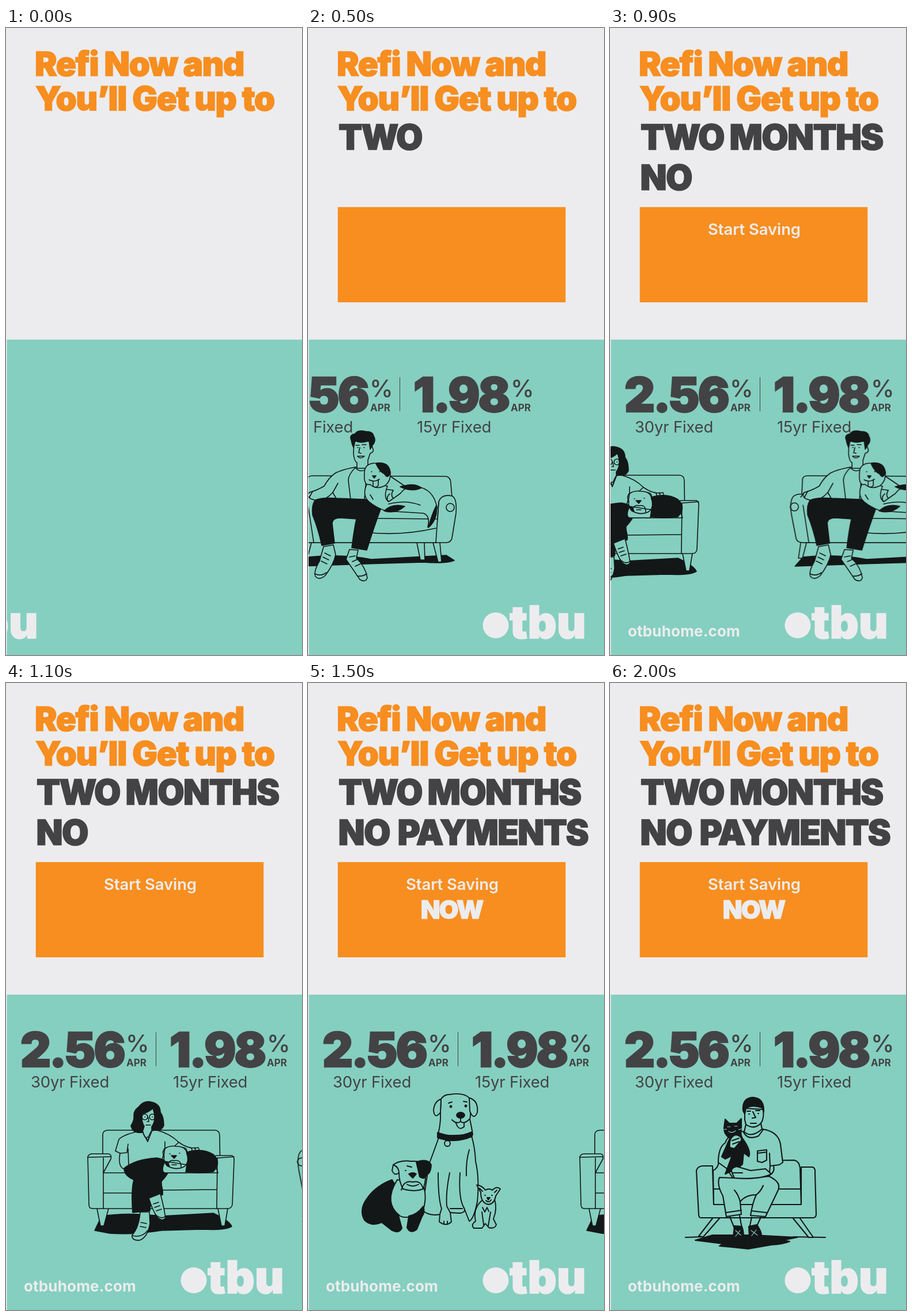
Animation, 514 px wide and 1088 px high, one loop 7000 ms. Source, as an HTML page:

```html
<!DOCTYPE html>
<html lang="en">
<head>
<meta charset="utf-8">
<title>Refi Now</title>
<style>
html, body { margin: 0; height: 100%; overflow: hidden; background: #ececef; }
svg { display: block; width: 100vw; height: 100vh; }
text { --ink: #434345; font-family: Inter, Roboto, sans-serif; fill: var(--ink); }

/* A thin outline makes the black weight heavier still. */
.head, .caps, .rate, .now, .brand { font-weight: 900; stroke: var(--ink); stroke-width: 1.6px; }
.head { font-size: 58px; letter-spacing: -1.4px; --ink: #f78e1f; }
.caps { font-size: 60px; letter-spacing: -1.7px; }
.rate { font-size: 82px; letter-spacing: -3px; stroke-width: 2.4px; }
.pct { font-size: 41px; font-weight: 500; }
.apr { font-size: 17px; font-weight: 700; }
.term { font-size: 27.5px; letter-spacing: -.2px; }
.pale { --ink: #ececef; }
.mid { text-anchor: middle; }
.start { font-size: 27.5px; font-weight: 600; letter-spacing: -.1px; }
.now { font-size: 44px; letter-spacing: -2px; stroke-width: 1.2px; }
.site { font-size: 26px; font-weight: 700; letter-spacing: .15px; }
.brand { font-size: 78px; letter-spacing: 0; }

.art { fill: none; stroke: #131718; stroke-width: 1.6; stroke-linecap: round; stroke-linejoin: round; }
.art .o { fill: #85cfc0; }
.art .k { fill: #131718; }
.art .thin { stroke: #85cfc0; stroke-width: 1.2; }

/* The 1 ms lead keeps every step clear of its boundary. Ten steps per second. */
.move { animation: 7s step-end -1ms infinite; }
#logo { animation-name: logo; }
#rates { animation-name: rates; }
#man { animation-name: man; }
#woman { animation-name: woman; }
#dogs { animation-name: dogs; stroke-width: 1.9; }
#cat { animation-name: cat; stroke-width: 2.1; }
.t300 { animation-name: t300; }
.t400 { animation-name: t400; }
.t700 { animation-name: t700; }
.t900 { animation-name: t900; }
.t1400 { animation-name: t1400; }

@keyframes t300 { 0% { opacity: 0 } 4.286%, to { opacity: 1 } }
@keyframes t400 { 0% { opacity: 0 } 5.714%, to { opacity: 1 } }
@keyframes t700 { 0% { opacity: 0 } 10%, to { opacity: 1 } }
@keyframes t900 { 0% { opacity: 0 } 12.857%, to { opacity: 1 } }
@keyframes t1400 { 0% { opacity: 0 } 20%, to { opacity: 1 } }

@keyframes logo {
  0% { transform: translateX(-427px); animation-timing-function: steps(4) }
  5.714%, to { transform: translateX(0) }
}
@keyframes rates {
  0% { transform: translateX(-606px); animation-timing-function: steps(6) }
  8.571%, to { transform: translateX(0) }
}
@keyframes man {
  0%, 4.286% { transform: translateX(-284px); animation-timing-function: steps(3) }
  8.571%, 10% { transform: translateX(142px); animation-timing-function: steps(5) }
  17.143%, to { transform: translateX(625px) }
}
@keyframes woman {
  0%, 10% { transform: translateX(-484px); animation-timing-function: steps(4) }
  15.714%, 18.571% { transform: translateX(0); animation-timing-function: steps(3) }
  22.857%, to { transform: translateX(495px) }
}
@keyframes dogs {
  0%, 17.143% { transform: translateX(-420px); animation-timing-function: steps(3) }
  21.429%, 22.857% { transform: translateX(0); animation-timing-function: steps(4) }
  28.571%, to { transform: translateX(424px) }
}
@keyframes cat {
  0%, 21.429% { transform: translateX(-435px); animation-timing-function: steps(5) }
  28.571%, to { transform: translateX(0) }
}
</style>
</head>
<body>
<svg viewBox="0 0 514 1088" preserveAspectRatio="none">
<clipPath id="panel"><path d="M1.5 540.700H514V1088H1.500Z"/></clipPath>

<text class="head" x="50" y="83">Refi Now and</text>
<text class="head" x="51" y="143">You’ll Get up to</text>
<text class="caps move t400" x="53" y="211">TWO</text>
<text class="caps move t700" x="207.500" y="211">MONTHS</text>
<text class="caps move t900" x="52.500" y="281">NO</text>
<text class="caps move t1400" x="155.500" y="281">PAYMENTS</text>

<path class="move t300" fill="#f78e1f" d="M51.700 310.700H447.300V476H51.700Z"/>
<text class="start pale mid move t700" x="250.500" y="359">Start Saving</text>
<text class="now pale mid move t1400" x="249.500" y="409">NOW</text>

<path fill="#85cfc0" d="M1.500 540.700H514V1088H1.500Z"/>
<g clip-path="url(#panel)">

<g id="rates" class="move">
  <text class="rate" x="25" y="666">2.56</text>
  <text class="pct" x="208" y="640">%</text>
  <text class="apr" x="209" y="665">APR</text>
  <text class="term" x="43" y="702">30yr Fixed</text>
  <path d="M260.500 606V665" stroke="#434345"/>
  <text class="rate" x="284" y="666">1.98</text>
  <text class="pct" x="453" y="640">%</text>
  <text class="apr" x="453" y="665">APR</text>
  <text class="term" x="290" y="702">15yr Fixed</text>
</g>

<g id="man" class="art move">
  <path class="k" d="M-14 934L0 918Q60 912 110 922L240 915L254 924Q240 930 200 927L100 930Z"/>
  <path class="o" d="M189 893L195 923H203L202 893M217 893L226 927L232 926L229 893M6 893L-1 920H-8L-4 893"/>
  <path class="o" d="M-2 808L-1 783Q0 777 8 777L240 778Q248 780 248 790L251 826L224 893H0Z"/>
  <path class="o" d="M227 822Q232 808 250 812Q259 816 257 842L250 885Q248 893 240 893H0Q-10 893-12 886L-20 845Q-24 822-17 813Q-8 805 14 812L22 825L28 850L225 852Z"/>
  <path d="M227 822L222 893M0 828L10 893M100 875Q160 882 222 868"/>
  <circle cx="247" cy="832" r="7"/><circle cx="-15" cy="831" r="7"/>
  <path class="o" d="M82 762Q60 766 48 772Q36 780 28 795Q14 803 2 806Q-3 812 5 817Q25 826 43 806L50 818L108 820L130 800L148 802Q142 812 150 818L172 804Q174 798 164 792L146 780Q132 768 106 762Z"/>
  <path d="M43 806L52 790M82 763Q70 775 70 785L74 818M104 763Q100 790 98 818M82 763Q92 774 104 763M150 818L140 822Q134 816 142 808M2 806L-4 814M8 804L2 815"/>
  <path class="o" d="M80 716L79 738Q80 752 85 754V764H104V750L108 738Q116 736 112 728L108 716Z"/>
  <path class="k" d="M75 715Q71 706 82 704Q86 697 100 700Q113 700 114 708Q119 716 112 724L108 731L106 716Q92 722 82 716L79 728Q76 722 75 715Z"/>
  <path d="M83 724h6M94 723h7M90 728L88 737L92 738M86 743Q91 749 98 743Z"/>
  <path class="k" d="M86 728h1M97 728h1M12 820Q20 814 50 816L100 818Q124 822 126 835Q115 865 102 906L76 902Q80 870 84 852L58 850Q42 850 42 860L46 894L24 898Q18 870 8 845Q6 828 12 820Z"/>
  <path class="o" d="M27 900L20 925Q9 944 13 952Q20 959 30 950Q45 930 48 914L44 897ZM72 905L66 922Q84 948 90 957Q100 963 103 954Q100 935 84 920L87 906Z"/>
  <path d="M23 925l10 5M26 918l10 5M29 911l10 5M12 947Q22 952 32 945M72 918l10-2M77 926l9-4M82 934l9-4M87 951Q95 952 102 947"/>
  <path class="o" d="M104 788Q92 810 106 822Q118 832 135 838L200 842Q213 846 208 866Q220 852 224 832Q218 800 190 796Q172 792 160 808L140 822Q130 815 138 795Z"/>
  <path class="k" d="M160 796Q185 788 197 798Q180 806 160 796ZM223 828Q226 852 209 867Q214 846 223 828ZM132 838Q146 824 168 830Q152 844 132 838Z"/>
  <path class="o" d="M98 772Q98 755 118 755Q140 752 143 772Q144 786 134 794Q118 802 108 792Q96 795 98 772Z"/>
  <path class="k" d="M118 756Q140 751 143 771Q139 784 133 774Q125 771 118 756ZM110 770h1M124 770h1M112 777h6l-3 4Z"/>
  <path d="M106 784Q115 789 124 783M113 786V795q5 4 9-1V785M108 810l5 8M140 826Q170 818 195 828"/>
</g>

<g id="woman" class="art move">
  <path class="k" d="M154 950L166 925Q210 918 270 925L360 920Q388 933 392 943Q380 950 340 948L270 950Q220 958 180 955Z"/>
  <path class="o" d="M158 912L164 942H170L178 912M368 912L374 942H380L385 912"/>
  <path class="o" d="M168 860V784Q168 776 178 776H362Q371 776 371 786L372 860Z"/>
  <path class="o" d="M142 822Q144 817 150 817H178Q184 818 182 826L169 850H368L358 824Q360 820 368 820H392Q397 822 396 830L393 905Q392 912 384 912H150Q144 912 144 905Z"/>
  <path d="M142 823L182 822M169 824V912M358 825L396 822M367 825L366 912M169 885H222M270 880L366 879M270 852V880"/>
  <path class="o" d="M230 778Q203 784 196 792L190 812L198 816Q194 838 204 843L268 835L276 812L290 806Q308 820 330 818Q338 814 334 806Q318 810 300 797Q285 782 262 776Z"/>
  <path d="M198 816L210 815L212 800M212 808L213 838M276 812V796M290 806L300 797M322 807l3 10M328 806l2 11"/>
  <path class="k" d="M230 736Q240 722 256 728Q268 732 268 745Q274 752 274 768Q270 778 258 776L236 780Q220 782 217 768Q223 760 222 750Q222 742 230 736Z"/>
  <path class="o" d="M236 748Q248 745 255 738Q262 758 253 770V778L246 796L237 779L240 769Q235 762 236 748Z"/>
  <circle cx="241" cy="753" r="5"/><circle cx="254" cy="753" r="5"/>
  <path d="M241 753h.5M254 753h.5M247 754l1 7h-3M243 767h8M238 779Q240 790 246 790L252 778"/><circle class="o" cx="246" cy="790" r="2"/>
  <path class="k" d="M205 842Q225 826 262 824Q286 828 284 845Q276 860 268 866Q273 878 272 888L252 896L250 916L220 919Q217 880 222 862Q205 855 205 842Z"/>
  <path class="o" d="M248 894L268 886Q274 908 277 928Q272 936 262 926Q254 914 248 894ZM233 918H249L250 938Q246 962 232 967Q218 968 219 958Q231 945 233 918Z"/>
  <path d="M256 904l9-3M258 910l9-3M261 916l9-3M259 922Q270 932 277 925M234 936l10 2M233 943l10 2M220 959Q236 963 246 950"/>
  <path class="k" d="M314 814Q340 806 360 818Q375 832 360 848Q335 852 312 848Q318 830 314 814Z"/>
  <path class="o" d="M276 830Q268 848 276 850H312L314 836ZM276 808Q284 802 296 804Q312 804 314 816Q319 834 308 840Q295 846 280 838Q271 830 276 808Z"/>
  <path class="k" d="M284 817h1M301 816h1M287 820h9l-4 5Z"/>
  <path d="M280 838Q284 826 292 829Q304 826 304 840M275 808Q270 816 275 822M306 806Q316 806 314 818M288 836h8"/>
</g>

<g id="dogs" class="art move">
  <path class="o" d="M228 786Q216 820 210 835L198 915Q212 926 229 922L228 935Q240 944 249 935L247 919L264 920Q275 918 271 911L280 934Q288 930 294 900Q298 860 291 830Q290 806 284 786Z"/>
  <path d="M226 850Q226 895 232 912L229 922M246 850Q239 885 241 908L247 919M264 850Q261 895 271 911M247 912H268M280 810Q274 830 275 855M236 934v5M242 934v4"/>
  <path class="o" d="M231 722Q236 714 246 714Q270 710 280 720Q284 745 281 757Q285 775 286 784L225 786Q231 765 230 745Z"/>
  <path class="o" d="M231 722Q219 726 218 742Q220 758 230 745ZM280 720Q296 724 294 745Q288 760 281 743Z"/>
  <path class="k" d="M225 780Q255 792 284 779L285 787Q255 800 225 789Z"/>
  <circle class="k" cx="248" cy="735" r="1.500"/><circle class="k" cx="274" cy="734" r="1.500"/>
  <ellipse class="k" cx="265" cy="750" rx="7" ry="5"/>
  <path d="M244 729l6-2M270 726l6 1M265 755V761M250 758Q258 766 265 761Q272 766 280 757M257 764Q262 778 271 770V764"/>
  <circle class="o" cx="242" cy="799" r="5"/>
  <path class="k" d="M146 862Q118 872 102 895Q88 914 98 932Q110 944 128 936L146 950Q158 956 163 946L152 905Q164 890 146 862Z"/>
  <path class="o" d="M155 862Q130 902 160 925Q172 931 198 920Q208 895 200 870Z"/>
  <path class="k" d="M200 908Q204 918 198 926L189 948Q178 957 172 945L175 925Q190 922 200 908Z"/>
  <path class="o" d="M148 836Q160 827 180 830Q198 828 204 840Q206 862 200 878Q185 884 165 878Q158 865 158 850Q150 856 146 846Z"/>
  <path class="k" d="M188 831Q208 824 214 836Q213 852 206 853Q203 863 194 857ZM169 846h1M175 852Q182 848 188 852L182 859Z"/>
  <path d="M162 880Q166 862 182 866Q196 862 200 878M172 870Q182 876 192 870M148 836Q158 840 158 850M172 838l8 2"/>
  <path class="o" d="M302 898Q286 912 291 934Q282 940 288 946H302L308 938L314 945Q324 948 327 940L322 930Q329 912 324 896Z"/>
  <path class="o" d="M300 884L293 871Q302 872 308 880Q314 876 320 880Q328 872 334 878L326 890Q324 903 314 905Q300 903 300 884Z"/>
  <path d="M307 889h1M319 889h1M309 898Q314 903 318 897M302 918L305 940M317 918L313 942M303 910l4 8 4-8 3 7M298 877l5 5M328 880l-4 4"/>
  <path class="k" d="M311 893h5l-3 4Z"/>
</g>

<g id="cat" class="art move">
  <path class="k" d="M148 967L178 958L250 958L325 962L300 967L312 969Q300 974 280 975L240 982L212 979L190 977L196 973Z"/>
  <path d="M131 962L160 961M318 961L374 962"/>
  <path class="o" d="M178 929L154 960L162 961L190 929M318 929L345 962H353L330 929"/>
  <path class="o" d="M180 905L179 846Q188 842 189 830L320 828Q329 830 330 842L332 905Z"/>
  <path class="o" d="M150 846Q152 839 160 838H178L180 905H332V840H352Q357 842 356 850L358 922Q358 928 352 928H158Q154 928 154 922Z"/>
  <path d="M180 878H332"/>
  <path class="o" d="M232 778Q206 780 200 798Q188 806 188 832L202 842L214 860H276L278 838L294 836L300 832L296 800Q292 778 264 774Z"/>
  <path d="M278 838L277 816M284 838Q288 852 268 858M256 812L272 810V828L264 832L256 830ZM256 816L272 814M232 780Q240 794 258 786L266 775"/>
  <path class="o" d="M190 858Q185 870 196 890L202 926L228 922L226 900Q236 888 254 888Q248 900 244 924L270 926L292 880Q298 866 276 856L240 860Z"/>
  <path d="M226 900Q223 888 216 880M254 888Q262 882 266 872M201 919L228 915M246 916L272 919M208 926L216 946M225 924L229 946M246 927L242 946M262 927L254 944"/>
  <path class="k" d="M216 942L229 943Q235 960 228 968Q216 972 214 962ZM241 943L255 940Q266 955 262 966Q250 974 242 962Z"/>
  <path class="thin" d="M218 950l9 8M226 950l-8 10M245 950l11 8M254 949l-8 10"/>
  <path class="o" d="M234 738V758L236 766L233 779Q246 790 264 774L262 764Q268 756 266 740Z"/>
  <path class="k" d="M231 742Q229 720 248 719Q268 720 267 744L264 737Q246 731 236 738L234 748Z"/>
  <path d="M238 743h6M253 742h7M241 748h1M257 747h1M248 744l5 10l-6 1M244 764h10M236 766Q250 776 262 764"/>
  <path class="k" d="M200 757L207 764H220L228 756V774Q226 784 230 790Q246 812 241 822L232 815L230 835L222 842L200 852L212 820L200 826L194 822L208 790Q197 782 198 772Z"/>
  <path class="thin" d="M204 770h5M216 769h5M206 778q6 4 12-1M194 776l8-2M223 775l9-2"/>
  <path class="o" d="M208 806Q206 788 218 784Q230 786 228 794L216 808ZM212 850Q208 842 220 839L244 846L270 843L280 852Q262 862 216 859Z"/>
  <path d="M212 794l12-4M213 800l11-4M214 850h16"/>
</g>

<g id="logo" class="move">
  <circle cx="326" cy="1036.500" r="22.500" fill="#ececef"/>
  <text class="brand pale" x="350" y="1059">tbu</text>
</g>
<text class="site pale move t700" x="31" y="1056">otbuhome.com</text>
</g>
</svg>
</body>
</html>
```
